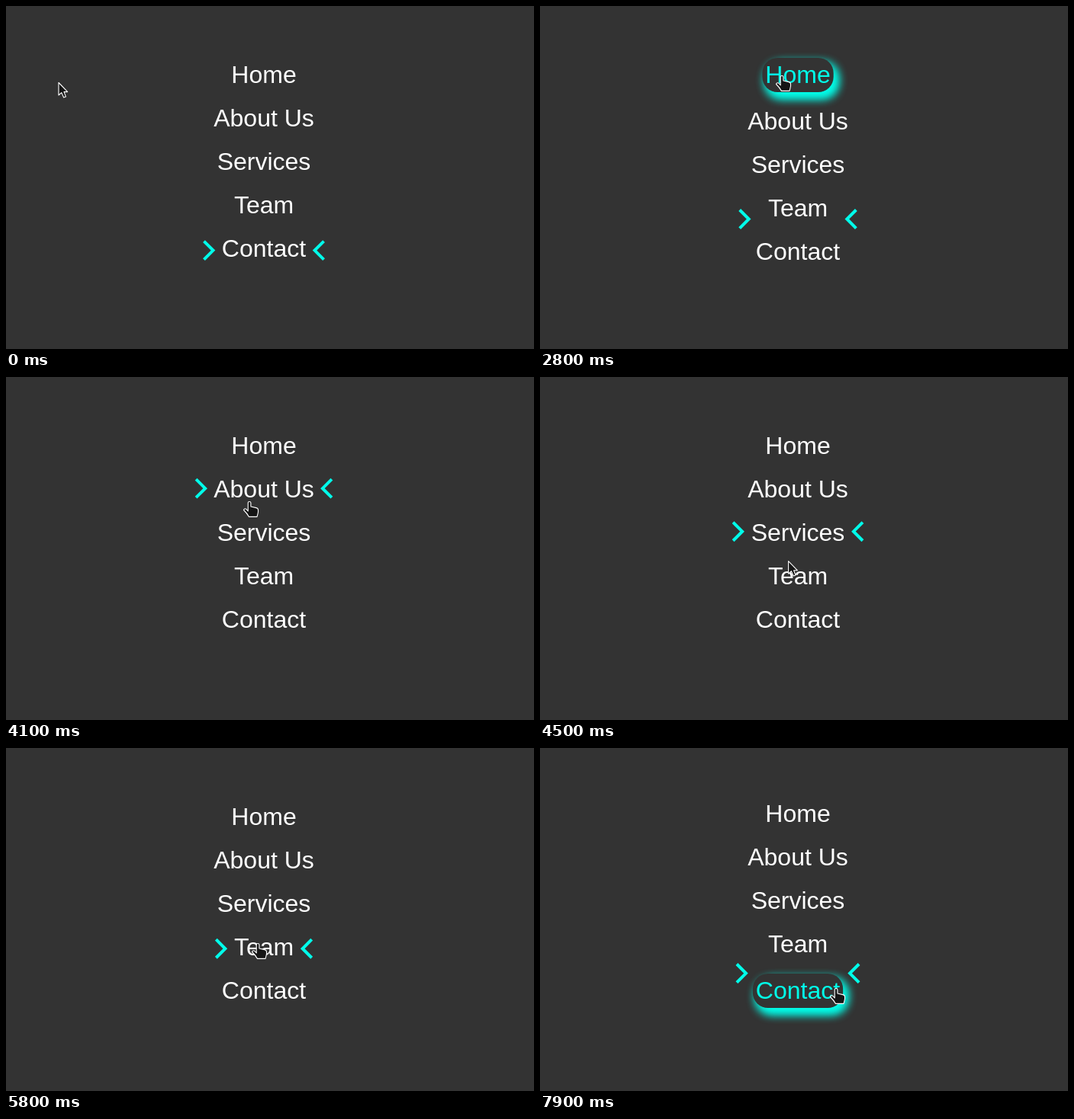
An HTML page that plays this animation: 692x450 px, repeating every 8 s.

```html
<!DOCTYPE html>
<html lang="en">
<head>
<meta charset="utf-8">
<title>Menu</title>
<style>
html, body { margin: 0; width: 100%; height: 100%; overflow: hidden; background: #333; }
svg { display: block; }
text { font: 32px "Liberation Sans", Arial, sans-serif; text-anchor: middle; }
</style>
</head>
<body>
<svg width="692" height="450" viewBox="0 0 692 450">
  <defs>
    <filter id="blur" x="-40%" y="-80%" width="180%" height="260%" color-interpolation-filters="sRGB">
      <feGaussianBlur stdDeviation="6.5" result="soft"/>
      <feMerge>
        <feMergeNode in="soft"/>
        <feMergeNode in="soft"/>
      </feMerge>
    </filter>
  </defs>
  <rect width="692" height="450" fill="#333"/>
  <g id="pill">
    <rect id="glow" height="45" rx="20" fill="#00ffea" filter="url(#blur)"/>
    <rect id="face" height="45" rx="20" fill="#333"/>
  </g>
  <g id="labels"></g>
  <g fill="none" stroke="#00ffea" stroke-width="4">
    <path id="left" d="M-9.5-7.5H7.5V9.5"/>
    <path id="right" d="M-9.5-7.5H7.5V9.5"/>
  </g>
  <g id="cursor" fill="#151515" stroke="#fff" stroke-width="1.1" stroke-linejoin="round">
    <path id="arrow" d="M0 .5V17L3.8 13.6L6.6 20L9.4 18.9L7 12.6H11.7Z"/>
    <path id="hand" d="M-1.8 13V2Q-1.8.5 0 .5Q1.9.5 1.9 2V7L9 8.6Q11.5 9.2 11.5 11.5V14Q11 17 10 20.4H-.5Q-3 16-7.5 11.5Q-6.8 9-4.3 10.2Z"/>
  </g>
</svg>
<script>
const LOOP = 8000, STEP = 100, SLIDE = 500, MID = 338;
const el = id => document.getElementById(id);
const mix = (a, b, k) => a + (b - a) * k;
const set = (node, attrs) => {
  for (const key in attrs) node.setAttribute(key, attrs[key]);
};
const show = (id, on) => set(el(id), { visibility: on ? "visible" : "hidden" });

const items = ["Home", "About Us", "Services", "Team", "Contact"].map((name, i) => {
  const label = document.createElementNS("http://www.w3.org/2000/svg", "text");
  label.textContent = name;
  set(label, { x: MID });
  el("labels").append(label);
  const half = label.getComputedTextLength() / 2;
  return { label, half, base: 101 + 57 * i, spot: [half + 22, 89 + 57.9 * i] };
});

// [press, release, item]
const presses = [
  [2727, 2950, 0], [3675, 3850, 1], [4120, 4300, 2], [4519, 4680, 3], [4844, 5050, 4],
  [5362, 5650, 3], [6230, 6400, 2], [6772, 6870, 1], [7620, LOOP, 4]
];

// Pointer tip: [time, x, y]; equal neighbours are rests.
const stops = [
  [300, 69, 100], [1200, 188, 390], [1600, 524, 381], [2100, 362, 46], [2400, 223, 76],
  [2800, 317, 91], [3000, 317, 91], [3200, 318, 116], [3600, 318, 116], [3800, 319, 163],
  [4100, 319, 163], [4850, 331, 305], [5100, 331, 305], [5500, 330, 256], [6000, 330, 256],
  [6750, 347, 165], [7300, 347, 165], [7500, 424, 240], [7750, 388, 315], [LOOP, 388, 315]
];

// cubic-bezier(.25, .1, .25, 1)
function ease(x) {
  if (x <= 0) return 0;
  if (x >= 1) return 1;
  let lo = 0, hi = 1, s;
  for (let i = 0; i < 24; i++) {
    s = (lo + hi) / 2;
    if (.75 * s * (1 - s) + s ** 3 < x) lo = s; else hi = s;
  }
  return .3 * s * (1 - s) ** 2 + 3 * s * s * (1 - s) + s ** 3;
}

// Each press restarts the slide from wherever the arrows are.
function arrowsAt(t) {
  let from = items[4].spot, to = from, start = 0;
  const at = time => from.map((v, i) => mix(v, to[i], ease((time - start) / SLIDE)));
  for (const [down, , i] of presses) {
    if (down > t) break;
    from = at(down);
    to = items[i].spot;
    start = down;
  }
  return at(t);
}

function speed(n, axis) {
  const a = stops[n - 1], b = stops[n], c = stops[n + 1];
  const still = !a || !c || a[2] === b[2] || b[2] === c[2];
  return still ? 0 : (c[axis] - a[axis]) / (c[0] - a[0]);
}

function pointerAt(t) {
  const n = Math.max(1, stops.findIndex(s => s[0] > t));
  const a = stops[n - 1], b = stops[n], span = b[0] - a[0];
  const u = Math.max(0, (t - a[0]) / span), v = 1 - u;
  return [1, 2].map(axis =>
    mix(a[axis], b[axis], u * u * (3 - 2 * u)) +
    span * u * v * (speed(n - 1, axis) * v - speed(n, axis) * u));
}

function draw(t) {
  const press = presses.find(([down, up]) => t >= down && t < up);
  const on = press ? press[2] : -1;

  items.forEach(({ label, base }, i) => set(label, {
    y: base + (press ? 4 * Math.sign(i - on) : 0),
    fill: i === on ? "#00ffea" : "#fff"
  }));

  show("pill", press);
  if (press) {
    const { half, base } = items[on];
    const x = MID - half - 4, y = base - 33, width = 2 * half + 8;
    set(el("face"), { x, y, width });
    set(el("glow"), { x: x + 5, y: y + 7, width });
  }

  const [gap, y] = arrowsAt(t);
  set(el("left"), { transform: `translate(${MID - gap} ${y}) rotate(45)` });
  set(el("right"), { transform: `translate(${MID + gap} ${y}) rotate(225)` });

  const [px, py] = pointerAt(t);
  const over = items.some(({ half, base }) =>
    Math.abs(px - MID) < half && py >= base - 29 && py < base + 6.5);
  set(el("cursor"), { transform: `translate(${px} ${py})` });
  show("hand", over);
  show("arrow", !over);
}

const began = performance.now();
function tick() {
  draw(Math.floor((performance.now() - began) % LOOP / STEP) * STEP);
  requestAnimationFrame(tick);
}
tick();
</script>
</body>
</html>
```
